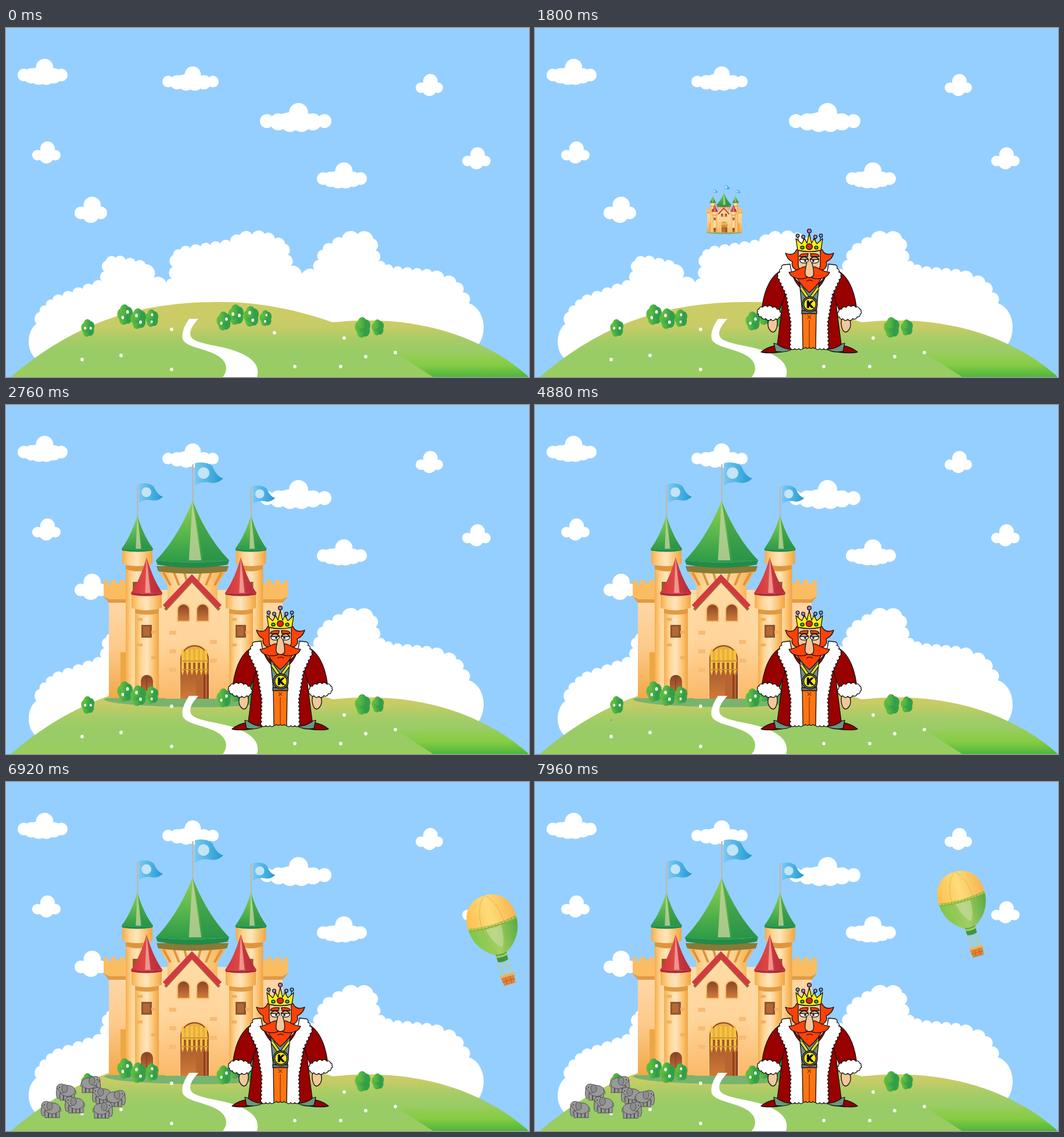
An HTML page for the animation above (8 s loop, 900x600 px).

```html
<!DOCTYPE html>
<html lang="en">
<head>
<meta charset="utf-8">
<title>The king's hill</title>
<style>
html, body { margin: 0; width: 100%; height: 100%; overflow: hidden; background: #95cfff; }
svg { display: block; }
</style>
</head>
<body>
<svg id="stage" width="900" height="600" viewBox="0 0 900 600"></svg>
<script>
const LOOP = 8000, STEP = 40;
const INK = 'stroke="#111" stroke-width="1.3" stroke-linejoin="round"';

const path = (d, fill, more = '') => `<path d="${d}" fill="${fill}" ${more}/>`;
const rect = (x, y, w, h, fill, more = '') =>
  `<rect x="${x}" y="${y}" width="${w}" height="${h}" fill="${fill}" ${more}/>`;
const oval = (x, y, rx, ry, fill, more = '') =>
  `<ellipse cx="${x}" cy="${y}" rx="${rx}" ry="${ry}" fill="${fill}" ${more}/>`;
const disc = (x, y, r, fill, more) => oval(x, y, r, r, fill, more);
const line = (d, color, width, more = '') =>
  path(d, 'none', `stroke="${color}" stroke-width="${width}" ${more}`);
const group = (transform, body) => `<g transform="${transform}">${body}</g>`;
const mirror = (axis, body) => body + group(`matrix(-1 0 0 1 ${2 * axis} 0)`, body);
const points = text => text.trim().split(/\s+/).map(p => p.split(',').map(Number));
const repeat = (n, make) => Array.from({ length: n }, (_, i) => make(i)).join('');

// Stops are spread evenly.
function gradient(id, vertical, ...colors) {
  const stops = colors.map((color, i) =>
    `<stop offset="${i / (colors.length - 1)}" stop-color="${color}"/>`).join('');
  return `<linearGradient id="${id}" ${vertical ? 'x2="0" y2="1"' : ''}>${stops}</linearGradient>`;
}

// Clockwise outline of outward bumps, each about `size` long.
function bumps(pts, size) {
  let [x, y] = pts[0], d = `M${x} ${y}`;
  for (const [px, py] of pts.slice(1)) {
    const len = Math.hypot(px - x, py - y), n = Math.max(1, Math.round(len / size));
    const r = len / n * .57;
    for (let i = 1; i <= n; i++)
      d += `A${r} ${r} 0 0 1 ${x + (px - x) * i / n} ${y + (py - y) * i / n}`;
    [x, y] = [px, py];
  }
  return d;
}

const ring = (x, y, rx, ry, n) => Array.from({ length: n + 1 }, (_, i) => {
  const a = i / n * Math.PI * 2;
  return [x + rx * Math.cos(a), y + ry * Math.sin(a)];
});

const HILL = 'M8 600C108 515 215 470 370 471C440 471 505 486 562 506C690 492 810 522 898 598V600Z';

const defs = '<defs>' +
  gradient('hill', 1, '#cccc66', '#cccc66', '#c6cc66', '#a6cc66', '#99cc66', '#99cc66', '#99ce5c') +
  gradient('field', 1, '#99cc5c', '#85cc44', '#4fb53c') +
  gradient('leaf', 0, '#66c23c', '#4db046', '#2b9848') +
  gradient('stone', 0, '#f5ad4c', '#ffd594', '#ffe5bc', '#fcc777', '#f0a444') +
  gradient('wall', 1, '#ffdca6', '#ffd59c', '#fbb968') +
  gradient('side', 1, '#ffd8a8', '#fdca8a', '#f2a848') +
  gradient('roof', 1, '#94d050', '#5cb84c', '#2c9a48') +
  gradient('red', 0, '#d2343a', '#e04a48', '#c42c38') +
  gradient('flag', 0, '#7cc8f2', '#49b2e4', '#2496d0') +
  gradient('door', 1, '#8a4426', '#d07a38') +
  gradient('warm', 0, '#ffbf50', '#ffdc78', '#f8b550') +
  gradient('cool', 0, '#80c648', '#a0d064', '#58aa42') +
  `<clipPath id="ground"><path d="${HILL}"/></clipPath></defs>`;

// A row of puffs inside a box, bigger in the middle, with one on top.
function cloud([x, y, w, h]) {
  const n = w / h > 1.5 ? 6 : 3, end = h * .24;
  const row = repeat(n, i => {
    const u = i / (n - 1), swell = Math.sin(Math.PI * u), r = h * (.24 + .09 * swell);
    return disc(x + end + u * (w - 2 * end), y + h * (.86 + .14 * swell) - r, r, '#fff');
  });
  return row + disc(x + w * .54, y + h * .33, h * .33, '#fff') +
    oval(x + w * .5, y + h * .62, w * .3, h * .32, '#fff');
}

function scenery() {
  const sky = points(`20,53,86,45 269,66,97,42 437,129,123,50 535,231,86,45
    705,79,47,38 45,195,49,38 785,205,49,38 118,290,56,45`);
  const bank = points(`54,510 58,488 80,467 166,436 172,400 189,395 240,406 254,430 276,442 286,431
    288,390 300,381 386,368 402,356 445,354 480,371 490,409 508,430 531,416 545,381 578,361
    605,354 632,362 640,402 666,414 733,420 775,437 797,472`);
  return rect(0, 0, 900, 600, '#95cfff') + sky.map(cloud).join('') +
    oval(63, 539, 24, 34, '#fff') + oval(789, 515, 33, 43, '#fff') +
    path(bumps(bank, 19) + 'V560L700 600H100L54 550Z', '#fff') +
    path(HILL, 'url(#hill)') +
    path('M670 558H850L900 600H735Z', 'url(#field)', 'clip-path="url(#ground)"');
}

function bush([x, y, r], i) {
  const berries = x < 600 ? repeat(2, j => {
    const a = i * 2.4 + j * Math.PI;
    return disc(.4 * Math.cos(a), .4 * Math.sin(a), .17, '#fff');
  }) : '';
  const leaves = repeat(5, k => {
    const a = k * Math.PI * .4 - .5;
    return disc(.42 * Math.cos(a), .45 * Math.sin(a), .56, k < 2 ? '#33a047' : 'url(#leaf)');
  });
  return group(`translate(${x} ${y}) scale(${r} ${r * 1.28})`, leaves + berries);
}

function plants() {
  const bushes = points(`141,516,12 205,493,14 251,499,12 228,500,14 396,493,14
    375,504,13 447,499,11 422,496,14 614,515,14 640,515,11`);
  const flowers = points(`131,570 198,563 285,518 285,587 462,524 497,582 576,582 582,533 619,565 670,558`);
  return path(`M315 500C305 515 302 526 304 535C309 548 340 551 358 560C378 569 385 585 373 600
      H432C437 582 428 566 388 553C362 545 328 543 319 532C313 522 322 510 331 500Z`, '#fff') +
    bushes.map(bush).join('') + flowers.map(([x, y]) => disc(x, y, 2.9, '#fff')).join('');
}

const flag = (x, y, s) => group(`translate(${x} ${y}) scale(${s})`,
  path('M0 2Q19 -2 30 7Q38 26 49 28Q38 39 24 35Q11 33 0 41Z', 'url(#flag)') +
  disc(15, 19, 10, '#c4e4f8'));

const arch = (x, y, w, h, fill) => path(
  `M${x} ${y + h}V${y + w / 2}a${w / 2} ${w / 2} 0 0 1 ${w} 0V${y + h}Z`, fill);

// Pointed roof with a light stripe and a dark brim; w is half the base.
function cone(x, top, base, w, fill, glow, brim) {
  const h = base - top, sag = w * .12;
  return group(`translate(${x} ${top})`,
    path(`M0 0Q${w * .4} ${h * .62} ${w} ${h}Q0 ${h + sag} ${-w} ${h}Q${-w * .4} ${h * .62} 0 0Z`, fill) +
    path(`M0 0L${w * .3} ${h}H${w}Q${w * .4} ${h * .62} 0 0Z`, brim, 'opacity=".45"') +
    path(`M0 0L${w * .24} ${h}H${-w * .1}Z`, glow, 'opacity=".8"') +
    path(`M${-w} ${h}Q0 ${h + sag} ${w} ${h}L${w * .96} ${h + w * .12}Q0 ${h + 2.4 * sag} ${-w * .96} ${h + w * .12}Z`, brim));
}

const drum = (x, top, h, w) =>
  path(`M${x - w} ${top}H${x + w}V${top + h}Q${x} ${top + h + 8} ${x - w} ${top + h}Z`, 'url(#stone)');

const backTower = x => rect(x - 20, 270, 41, 235, 'url(#stone)') +
  rect(x - 8, 304, 12, 22, '#9a552c') +
  group('translate(0 5)', path(`M${x - 20} 271h40v6q-20 8 -40 0Z`, '#dd953f')) +
  drum(x, 250, 23, 26) + cone(x, 190, 247, 27, 'url(#roof)', '#c3d29c', '#238a48');

const redTower = x => rect(x - 20, 348, 41, 157, 'url(#stone)') +
  path(`M${x - 20} 351h41v7q-20 5 -41 0Z`, '#e09a42') +
  drum(x, 326, 23, 26) + cone(x, 262, 323, 27, 'url(#red)', '#f0aaa0', '#a8283a') +
  rect(x - 9, 378, 18, 22, '#965230') + rect(x - 6, 381, 11, 16, '#b06a34') +
  repeat(4, i => rect(x - 16 + i % 2 * 24, 366 + i * 22, 9, 5, '#f0b062')) +
  arch(x - 10, 464, 21, 41, 'url(#door)') + line(`M${x} 466V505`, '#7a3a22', 1);

function castle() {
  const axis = 326.5;
  const wing = rect(177, 330, 40, 174, 'url(#side)') + rect(197, 425, 20, 78, '#eda744') +
    path('M168 302h8v6h5v-7h9v6h6v-6h9v6h9v27h-36l-10 -5Z', '#fbbd62') +
    path('M168 329l10 5h36v6h-37Z', '#e29a44') + arch(216, 393, 6, 28, '#a35a2c');
  const window = arch(294, 341, 23, 32, '#f8bd70') + arch(296, 343, 19, 28, 'url(#door)');
  return path('M168 506Q180 500 210 502H455Q475 504 474 509Q400 522 300 519Q178 516 168 506Z', '#78b36f') +
    line('M226.5 137V192M321.5 102V168M422 140V192', '#b9b9b4', 2.6) +
    flag(325, 98, 1) + flag(229, 134, .84) + flag(425, 138, .78) + mirror(axis, wing) +
    rect(222, 318, 202, 186, 'url(#wall)') + backTower(226) + backTower(421.5) +
    path('M260 280H381L364 310V350H278V310Z', 'url(#stone)') +
    mirror(321, repeat(3, i => line(`M${271 + i * 18} 288l${12 - i * 3} 22`, '#e0923c', 4))) +
    path('M259 277H383L380 286Q320 294 262 286Z', '#8a7a35') +
    cone(321, 165, 267, 63, 'url(#roof)', '#c3d29c', '#238a48') +
    path('M274 348L320 300L368 348V505H274Z', 'url(#wall)') +
    repeat(5, i => rect(281 + i % 2 * 70, 388 + i * 16, 12, 7, '#f7bb74')) +
    line('M274 352L320 302L367 352', '#a8623a', 5) +
    line('M273 347L320 297L368 347', '#d23a40', 8.5) +
    mirror(322, window) +
    arch(298, 411, 53, 94, '#fbcb80') + arch(300, 413, 49, 92, 'url(#door)') +
    rect(327, 463, 22, 42, '#b8642e') + line('M341.5 463V505M347.5 463V505', '#8c3f24', 3) +
    arch(302, 415, 45, 28, '#ecae3c') +
    repeat(6, i => path(`M${302 + i * 8} 420h4v38l-2 7l-2 -7Z`, '#f5c442')) +
    line('M301 440H348M301 455H348', '#cf9430', 2) +
    redTower(242) + redTower(404);
}

function king() {
  const axis = 472, skin = '#f3c79a', hair = '#ff4208';
  const edge = points('461,551 440,551 441,505 433,458 418,426 428,407');
  const half =
    path('M389 557Q400 548 415 546L423 557Q400 560 389 557Z', '#990000', INK) +
    path('M411 542Q428 547 434 537L441 553Q428 559 414 556Z', '#6a9680', INK) +
    path('M402 502Q399 513 404 519Q409 526 414 520Q419 510 416 500Z', skin, INK) +
    path('M432 414L424 490L417 544Q430 554 448 552L456 440Z', '#990000', INK) +
    path('M430 414C406 422 395 450 391 478L420 486C426 474 431 458 433 440Z', '#990000', INK) +
    group('rotate(8 403 490)', path(bumps(ring(403, 490, 20, 10.5, 14), 9) + 'Z', '#fff', INK)) +
    path(bumps(edge, 7) + 'L439 406Q442 432 456 446L460 490Z', '#fff', INK);
  const face =
    path('M455 393Q455 387 470 388L469 393Z', hair, INK) +
    oval(463, 399, 7.5, 5.2, '#fff', INK) +
    path('M455.5 398Q463 389 470.5 398Z', '#e0b48a', INK) + disc(465, 400.5, 1.8, '#111');
  const balls = [10.5, 20].map((dx, i) =>
    line(`M${axis - dx} ${359 - i * 2}L${axis - dx * .9} 372`, '#111', 1.2) +
    disc(axis - dx, 359 - i * 2, 2.8, i ? '#6fa8dc' : '#b58ad0', INK)).join('');
  return rect(452, 436, 40, 56, '#6c8f80') +
    path(bumps(points('459,490 485,490 485,549 459,549 459,490'), 6) + 'Z', '#ff7410', INK) +
    line('M472 502V549M469 494l6 6M475 494l-6 6', '#8c3300', 1.3) +
    mirror(axis, half) +
    rect(459, 486, 26, 5, '#777', INK) +
    line('M458 447L472 467L487 447', '#111', 6) + line('M458 447L472 467L487 447', '#e8e020', 3.6) +
    disc(473, 475, 13, '#8a8a70', INK) + disc(473, 475, 10.5, '#ffec14', INK) +
    '<text x="473" y="481" font-family="DejaVu Sans, sans-serif" font-weight="bold" font-size="16" text-anchor="middle" stroke="#111">K</text>' +
    path('M450 381Q446 393 431 387Q434 398 443 402Q440 410 449 416H496Q504 410 501 402Q511 398 514 387Q499 393 494 381Z', hair, INK) +
    path('M453 381H491V408Q489 422 472 424Q455 422 453 408Z', skin, INK) + mirror(axis, face) +
    path('M447 420Q452 438 472 455Q492 438 497 420Q472 408 447 420Z', hair, INK) +
    mirror(axis, path('M472 414C462 404 454 419 437 420C442 433 464 434 472 426Z', hair, INK)) +
    path('M468 402Q463 422 466 426Q472 432 479 426Q481 418 476 402', skin, INK) +
    line('M467 435Q473 432 478 435', '#7c1a00', 1.8) + mirror(axis, balls) +
    path('M452 382L449 362L459 371L464 362L468 370L472 353L476 370L480 362L485 371L495 362L492 382Q472 387 452 382Z', '#ffee10', INK) +
    disc(axis, 349, 3.4, '#b070c0', INK) + oval(axis, 376, 5.5, 5, '#e02810', INK) +
    mirror(axis, oval(460, 377.5, 3, 2.6, '#4aa83c', INK));
}

function herd() {
  const edge = 'stroke="#505050" stroke-width="1"', gray = '#999';
  const one = repeat(4, i => rect(-10 + i * 6.5, 3, 5.5, 12, gray, edge)) +
    oval(3, -1, 13, 9.5, gray, edge) + disc(-8, -5, 8, gray, edge) +
    path('M-15 -6Q-18 4 -15 11Q-12 14 -10 10Q-13 6 -9 1Z', gray, edge) +
    oval(-2, -5, 5, 7, '#8c8c8c', edge) + line('M15 -4Q19 0 17 5', '#505050', 1) +
    disc(-11, -7, .9, '#222');
  return points('146,519 103,532 165,538 189,543 118,554 77,562 167,563').map(([x, y], i) =>
    group(`translate(${x} ${y}) scale(${i % 3 ? 1 : -1} 1)`, one)).join('');
}

function balloon() {
  return mirror(0, line('M-9 64L-9 92M-3 66L-4 92', '#c3cf70', 1.3)) +
    path('M-10 46H10L9 65Q0 68 -9 65Z', '#3f9440') + line('M-10 55Q0 58 10 55', '#9dcc5c', 4) +
    path('M-43 -4C-43 24 -27 42 -12 51Q0 55 12 51C27 42 43 24 43 -4Z', 'url(#cool)') +
    path('M-43 -4C-43 -36 -24 -52 0 -52S43 -36 43 -4Q0 4 -43 -4Z', 'url(#warm)') +
    mirror(0, line('M0 -52C-24 -34 -26 20 -6 52', '#b8a03c', .8, 'opacity=".6"')) +
    path('M-14 3Q0 5 14 3Q14 30 5 42Q-10 30 -14 3Z', '#cfdca4', 'opacity=".6"') +
    line('M-43 -1Q0 7 43 -1', '#86b440', 4) +
    line('M-43 -2Q0 6 43 -2', '#ffc850', 1.6, 'stroke-dasharray="4 2"') +
    path('M-12 90H12L10 107H-10Z', '#df8538') + rect(-12.5, 89, 25, 4, '#f5b050') +
    line('M-4 94V106M4 94V106M-11 100H11', '#b3602c', 1);
}

const makers = { castle, plants, herd, king, balloon }, parts = {};
const stage = document.getElementById('stage');
stage.innerHTML = defs + scenery() +
  Object.keys(makers).map(id => `<g id="${id}">${makers[id]()}</g>`).join('');
for (const id in makers) parts[id] = document.getElementById(id);

// Grows a part about (x, y) from nothing to full size.
function grow(part, t, start, length, x, y) {
  const s = Math.min(1, Math.max(0, (t - start) / length));
  part.style.display = s ? '' : 'none';
  part.setAttribute('transform', `translate(${x} ${y}) scale(${s}) translate(${-x} ${-y})`);
}

function draw(time) {
  const t = Math.floor(time % LOOP / STEP) * STEP;
  grow(parts.king, t, 0, 1160, 470.5, 452);
  grow(parts.castle, t, 1560, 1200, 326, 313);
  grow(parts.herd, t, 4840, 1520, 131, 542);
  const n = (t - 6920) / STEP, s = 1 - .05 * Math.max(0, (t - 7160) / 800);
  parts.balloon.style.display = t < 5720 ? 'none' : '';
  parts.balloon.setAttribute('transform',
    `translate(${837.5 - 3.94 * n} ${245 - 1.66 * n}) rotate(-16) scale(${s})`);
}

const begin = performance.now();
function tick() {
  draw(performance.now() - begin);
  requestAnimationFrame(tick);
}
tick();
</script>
</body>
</html>
```
